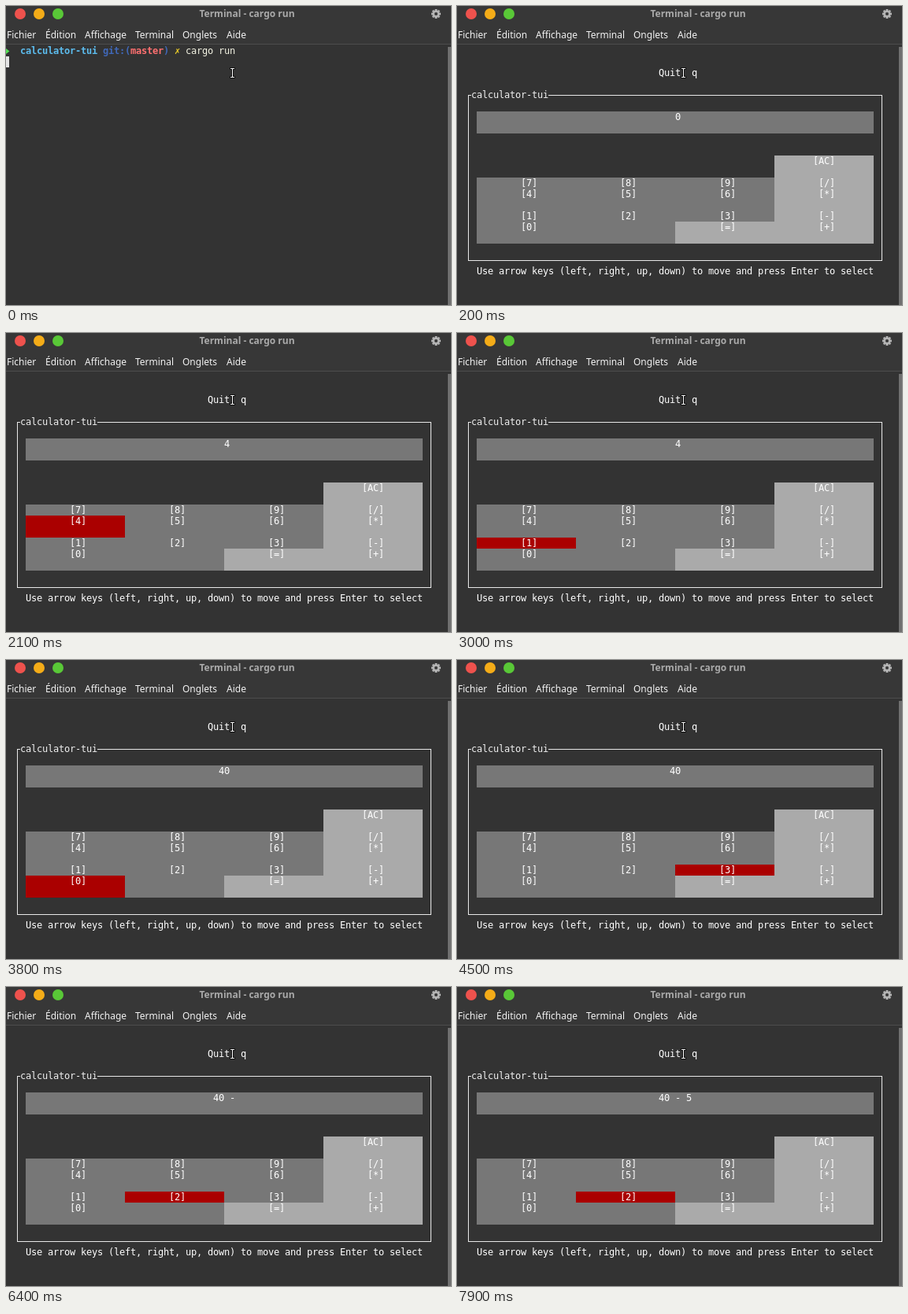
An HTML page with a canvas that plays this animation: 565x380 px, repeating every 8000 ms.

```html
<!DOCTYPE html>
<html lang="fr">
<head>
<meta charset="utf-8">
<title>Terminal - cargo run</title>
<style>
  html, body { margin: 0; width: 100%; height: 100%; overflow: hidden; background: #333; }
  canvas { display: block; width: 565px; height: 380px; }
</style>
</head>
<body>
<canvas id="stage" width="565" height="380"></canvas>
<script>
const ctx = document.getElementById('stage').getContext('2d');
const LOOP = 8000, CELL_W = 7, CELL_H = 14;
const BG = '#333333', FG = '#ffffff', KEY = '#777777', OPERATOR = '#aaaaaa', ACTIVE = '#aa0000';

// Terminal grid: column and row to pixels
const colX = col => -3 + col * CELL_W;
const rowY = row => 50 + row * CELL_H;

// Keypad: label, keypad column, terminal row, height in rows
const KEYS = [
  ['AC', 3, 10, 2],
  ['7', 0, 12, 1], ['8', 1, 12, 1], ['9', 2, 12, 1], ['/', 3, 12, 1],
  ['4', 0, 13, 2], ['5', 1, 13, 2], ['6', 2, 13, 2], ['*', 3, 13, 2],
  ['1', 0, 15, 1], ['2', 1, 15, 1], ['3', 2, 15, 1], ['-', 3, 15, 1],
  ['0', 0, 16, 2], ['', 1, 16, 2], ['=', 2, 16, 2], ['+', 3, 16, 2]
];
const SELECTION = [
  [0, ''], [1100, '7'], [1800, '4'], [3000, '1'], [3100, '0'], [4100, '1'],
  [4300, '2'], [4500, '3'], [4700, '-'], [5700, '3'], [5800, '2'],
  [6000, '1'], [6400, '2'], [6800, '5'], [7900, '2']
];
const DISPLAY = [[0, '0'], [2100, '4'], [3800, '40'], [5300, '40 -'], [7400, '40 - 5']];
const TUI_START = 100;

const valueAt = (steps, t) => steps.filter(([start]) => start <= t).pop()[1];

function rect(x, y, w, h, color) {
  ctx.fillStyle = color;
  ctx.fillRect(x, y, w, h);
}

function disc(x, y, r, color) {
  ctx.fillStyle = color;
  ctx.beginPath();
  ctx.arc(x, y, r, 0, Math.PI * 2);
  ctx.fill();
}

function label(text, x, y, color, weight = '') {
  ctx.font = `${weight} 12px "Noto Sans", sans-serif`;
  ctx.fillStyle = color;
  ctx.fillText(text, x, y);
}

function print(text, col, row, color = FG, weight = '') {
  ctx.font = `${weight} 12px "DejaVu Sans Mono", monospace`;
  ctx.fillStyle = color;
  [...text].forEach((ch, i) => ctx.fillText(ch, colX(col + i), rowY(row) + 11));
}

function drawGear(x, y) {
  ctx.save();
  ctx.translate(x, y);
  for (let i = 0; i < 8; i++) {
    rect(-1.4, -6, 2.8, 3, '#b4b4b4');
    ctx.rotate(Math.PI / 4);
  }
  ctx.restore();
  disc(x, y, 4.5, '#b4b4b4');
  disc(x, y, 2, '#373737');
}

function drawWindow() {
  rect(0, 0, 565, 380, BG);
  rect(0, 0, 565, 48, '#373737');
  rect(0, 48, 565, 1, '#4c4c4c');
  disc(18, 10, 7, '#ee524d');
  disc(42, 10, 7, '#f4ac18');
  disc(66, 10, 7, '#59c837');
  ctx.textAlign = 'center';
  label('Terminal - cargo run', 306, 14, '#aaaaaa', 'bold');
  ctx.textAlign = 'left';
  drawGear(546, 10);
  const menu = [['Fichier', 1], ['Édition', 50], ['Affichage', 100],
    ['Terminal', 164], ['Onglets', 224], ['Aide', 280]];
  for (const [name, x] of menu) label(name, x, 41, '#f2f2f2');
  rect(561, 52, 4, 328, '#707070');
}

function drawPrompt() {
  ctx.fillStyle = '#55e055';
  ctx.beginPath();
  ctx.moveTo(0, 54);
  ctx.lineTo(4.5, 57.5);
  ctx.lineTo(0, 61);
  ctx.fill();
  print('calculator-tui', 3, 0, '#5cbcee', 'bold');
  print('git:(', 18, 0, '#4068b8', 'bold');
  print('master', 23, 0, '#ff7070', 'bold');
  print(')', 29, 0, '#4068b8', 'bold');
  print('✗', 31, 0, '#f0d028', 'bold');
  print('cargo run', 33, 0, '#f4f4e4');
  rect(0, 64, 4, CELL_H, '#e4e4e4');
}

function drawCalculator(t) {
  print('Quit: q', 37, 2);

  ctx.strokeStyle = '#e8e8e8';
  ctx.lineWidth = 1;
  ctx.strokeRect(14.5, 113.5, 525, 210);
  rect(18, 107, 98, CELL_H, BG);
  print('calculator-tui', 3, 4, '#f0f0f0');

  rect(25, 134, 504, 28, KEY);
  const value = valueAt(DISPLAY, t);
  print(value, 40 - Math.floor(value.length / 2), 6);

  const selected = valueAt(SELECTION, t);
  for (const [name, column, row, rows] of KEYS) {
    const isOperator = column === 3 || name === '=';
    const color = name && name === selected ? ACTIVE : isOperator ? OPERATOR : KEY;
    rect(25 + column * 126, rowY(row), 126, rows * CELL_H, color);
    if (name) print(`[${name}]`, 12 + column * 18 - (name.length - 1), row);
  }

  print('Use arrow keys (left, right, up, down) to move and press Enter to select', 4, 20);
}

function drawPointer() {
  rect(284, 78, 7, 3, '#111');
  rect(284, 89, 7, 3, '#111');
  rect(286, 79, 3, 12, '#111');
  rect(285, 79, 5, 1, '#fff');
  rect(285, 90, 5, 1, '#fff');
  rect(287, 79, 1, 12, '#fff');
}

function draw(t) {
  drawWindow();
  if (t < TUI_START) drawPrompt();
  else drawCalculator(t);
  drawPointer();
}

const startTime = performance.now();
function tick() {
  draw((performance.now() - startTime) % LOOP);
  requestAnimationFrame(tick);
}
tick();
</script>
</body>
</html>
```
